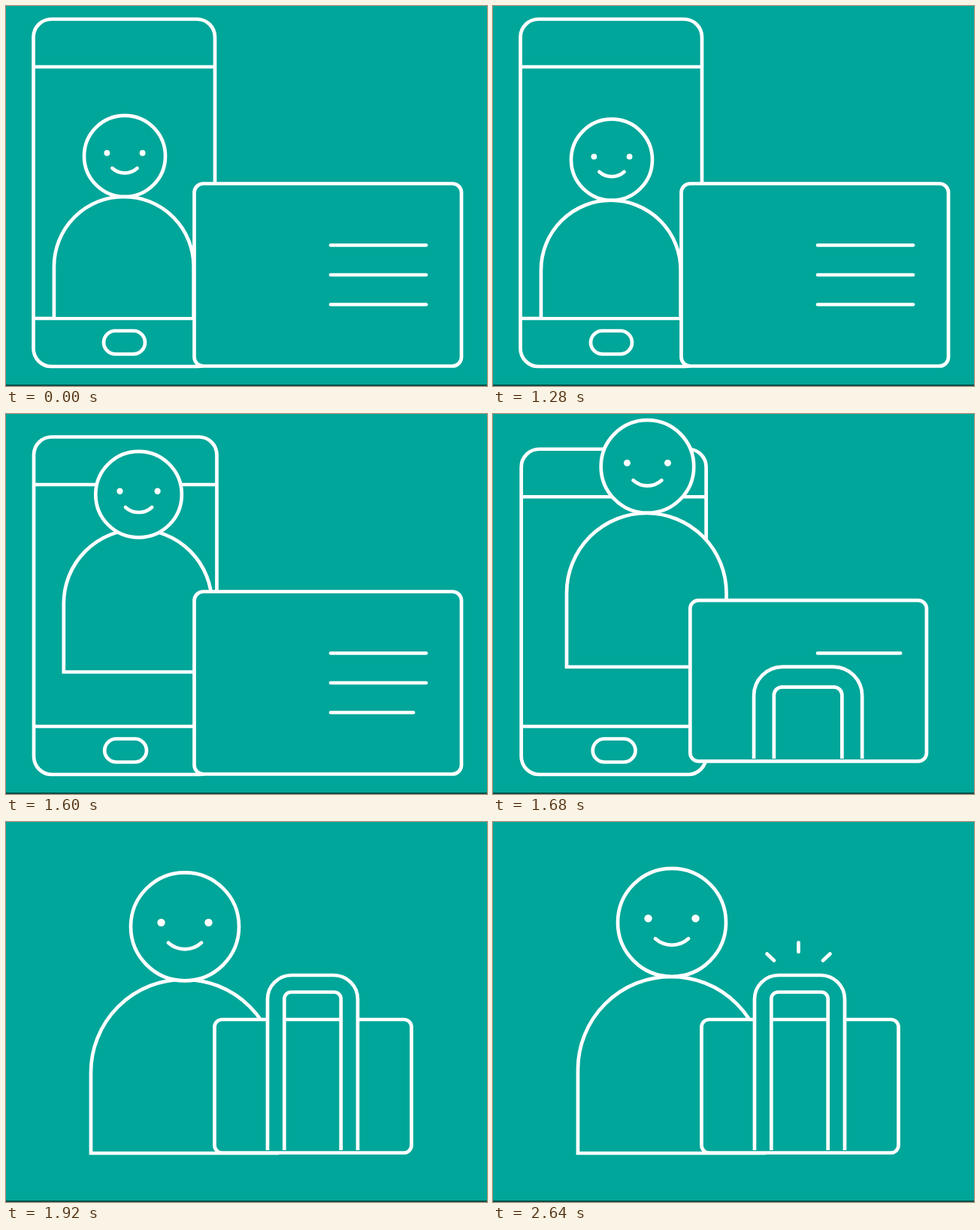
Animation of 640x506 px, one loop 3360 ms. Source, as an HTML page with a canvas:

```html
<!DOCTYPE html>
<html lang="en">
<head>
<meta charset="utf-8">
<title>Ready to go</title>
<style>
html, body { margin: 0; width: 100%; height: 100%; overflow: hidden; background: #00a699; }
canvas { display: block; width: 640px; height: 506px; }
</style>
</head>
<body>
<canvas id="stage" width="640" height="506"></canvas>
<script>
const ctx = document.getElementById('stage').getContext('2d');
const LOOP = 3360, STEP = 80;
const TEAL = '#00a699', WHITE = '#fff', EDGE = '#07504b';
const JUMP = 1440, LAND = 1888, LAG = 34;

const mix = (a, b, k) => a + (b - a) * k;
const ramp = (t, from, to) => Math.min(1, Math.max(0, (t - from) / (to - from)));
const smooth = (t, from, to) => {
  const u = ramp(t, from, to);
  return u * u * (3 - 2 * u);
};
const easeOut = (t, from, to) => 1 - (1 - ramp(t, from, to)) ** 2;

function paint(fill) {
  if (fill) ctx.fill();
  ctx.stroke();
}

function box(x0, y0, x1, y1, r, fill) {
  ctx.beginPath();
  ctx.roundRect(x0, y0, x1 - x0, y1 - y0, r);
  paint(fill);
}

function line(x0, y0, x1, y1, cap = 'round') {
  ctx.lineCap = cap;
  ctx.beginPath();
  ctx.moveTo(x0, y0);
  ctx.lineTo(x1, y1);
  ctx.stroke();
  ctx.lineCap = 'butt';
}

function dot(x, y, r) {
  ctx.fillStyle = WHITE;
  ctx.beginPath();
  ctx.arc(x, y, r, 0, Math.PI * 2);
  ctx.fill();
  ctx.fillStyle = TEAL;
}

function drawPhone(t) {
  if (t >= 1760) return;
  const k = (Math.max(0, t - JUMP) / 160) ** 2;
  const left = 36.5 + k * 0.5, right = 278 + k * 2.5, top = 17.5 + k * 13;
  box(left, top, right, 480, 24, true);
  line(left, top + 63.5, right, top + 63.5, 'butt');
  line(left, 416, right, 416, 'butt');
  box(130 + k * 1.2, 432.5, 185 + k * 2, 463.5, 15.5);
}

function drawBody(x, r, top, bottom) {
  ctx.beginPath();
  ctx.moveTo(x - r, bottom);
  ctx.lineTo(x - r, top + r);
  ctx.arc(x, top + r, r, Math.PI, 0);
  ctx.lineTo(x + r, bottom);
  ctx.closePath();
  paint(true);
}

function drawHead(x, y, r) {
  const s = r / 72;
  ctx.beginPath();
  ctx.arc(x, y, r, 0, Math.PI * 2);
  paint(true);
  dot(x - 31.5 * s, y - 5.5 * s, 5.2 * s);
  dot(x + 31.5 * s, y - 5.5 * s, 5.2 * s);
  ctx.lineCap = 'round';
  ctx.beginPath();
  ctx.arc(x, y - 2.7 * s, 32.7 * s, 0.83, Math.PI - 0.83);
  ctx.stroke();
  ctx.lineCap = 'butt';
}

// Height of the feet in free flight
function flight(t) {
  const u = (t - JUMP) / 160;
  return 435 - 143.5 * u + 52 * u * u;
}

function drawPerson(t) {
  const x = mix(158, 238, smooth(t, 1500, 1820));
  const r = mix(54, 72, smooth(t, 1480, 1920));
  const floor = 430 + 11 * easeOut(t, 1200, 1520);
  const bottom = Math.min(floor, flight(t));
  const late = Math.min(floor, flight(t - LAG));
  const beat = Math.max(0, t - LAND) / 48;
  const squash = 8 * beat * Math.exp(1 - beat);
  const stretch = 0.03 * (floor - bottom);
  const top = bottom - (3.28 * r - 1) - stretch + squash * 0.5;
  ctx.save();
  if (t < 1600) {
    ctx.beginPath();
    ctx.rect(0, 0, 640, 414);
    ctx.clip();
  }
  drawBody(x - 1.2, r * 1.72, top, bottom);
  // The head trails behind the feet
  drawHead(x, top - r + late - bottom + squash * 0.5, r);
  ctx.restore();
}

function drawHandle(cx, base, s, rise) {
  const top = base - rise * s;
  const arch = (half, y, r) => {
    ctx.roundRect(cx - half * s, y, half * 2 * s, base - y + 60, [r, r, 0, 0]);
  };
  ctx.save();
  ctx.beginPath();
  ctx.rect(0, 0, 640, base);
  ctx.clip();
  ctx.beginPath();
  arch(60, top, 32 * s);
  arch(37.7, top + 22.5 * s, 9 * s);
  ctx.fill('evenodd');
  ctx.stroke();
  ctx.restore();
}

function drawSparks(k) {
  if (k <= 0) return;
  for (const side of [-1, 0, 1]) {
    const slant = Math.abs(side);
    const x = 406.5 + side * 32.5, y = 173 + slant * 11.5;
    line(x, y, x + side * 9.5 * k, y - (12.5 - slant * 3.5) * k);
  }
}

// The card shrinks into a suitcase
function drawCase(t) {
  const k = easeOut(t, 1600, 1920);
  const left = mix(250.5, 277.5, k), right = mix(606, 539.5, k);
  const top = mix(236.5, 263, k), bottom = mix(479.5, 440.5, k);
  box(left, top, right, bottom, mix(12, 10, k), true);

  for (let i = 0; i < 3; i++) {
    const begin = 1668 - i * 40, y = 318.5 + i * 39.5;
    const rest = 1 - ramp(t, begin, begin + 90);
    if (rest > 0) line(432, y, 432 + 127 * rest, y);
  }

  if (k > 0) drawHandle((left + right) / 2 - 0.5, bottom - 3.5, (right - left) / 262, 233 * k);
  drawSparks(easeOut(t, 1920, 2080));
}

function draw(t) {
  ctx.fillStyle = TEAL;
  ctx.strokeStyle = WHITE;
  ctx.lineWidth = 4.7;
  ctx.fillRect(0, 0, 640, 506);
  drawPhone(t);
  drawPerson(t);
  drawCase(t);
  ctx.fillStyle = EDGE;
  ctx.fillRect(0, 504, 640, 2);
}

const start = performance.now();
function tick() {
  const t = Math.max(0, performance.now() - start) % LOOP;
  draw(Math.floor(t / STEP) * STEP);
  requestAnimationFrame(tick);
}
draw(0);
requestAnimationFrame(tick);
</script>
</body>
</html>
```
